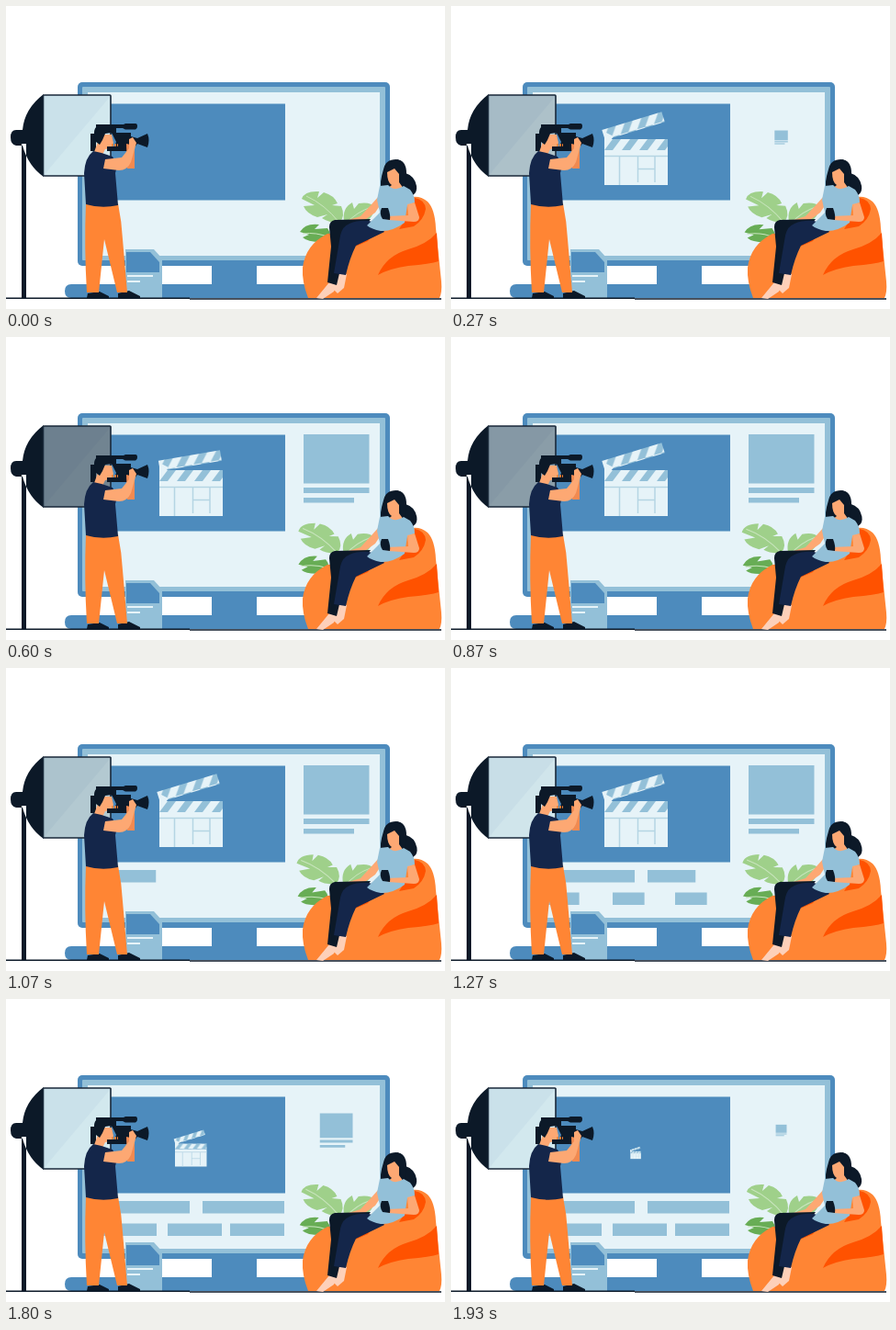
Write an HTML page that moves like this. It is 478 px wide and 330 px high and loops after 1990 ms.

```html
<!DOCTYPE html>
<html lang="en">
<head>
<meta charset="utf-8">
<title>Video studio</title>
<style>
html, body { margin: 0; width: 100%; height: 100%; overflow: hidden; background: #fff }
svg { display: block }
.soft { filter: blur(.6px) }
.blue { fill: #4d8bbd }
.sky { fill: #93c0d8 }
.pale { fill: #e6f3f8 }
.dark { fill: #0c1928 }
.navy { fill: #14264a }
.orange { fill: #ff8534 }
.red { fill: #ff5200 }
.skin { fill: #fda873 }
.leaf { fill: #9fd08a }
.moss { fill: #68ad55 }
.vein { fill: none; stroke: #c9e5be; stroke-width: 1 }
</style>
</head>
<body>
<svg width="478" height="330" viewBox="0 0 478 330">
  <defs>
    <pattern id="stripes" width="19" height="12" patternUnits="userSpaceOnUse" patternTransform="translate(167 145)">
      <path class="pale" d="M0 0H19V12H0Z"/>
      <path class="sky" d="M9 0H18L9 12H0Z"/>
    </pattern>
  </defs>

  <!-- monitor -->
  <g class="soft">
    <path class="blue" d="M71 303H340V318H71Q64 318 64 310.500T71 303ZM224 280H273V306H224Z"/>
    <rect class="blue" x="78" y="83" width="340" height="200" rx="5"/>
    <rect class="sky" x="83" y="88" width="330" height="189" rx="1"/>
    <rect class="pale" x="89" y="94" width="318" height="178"/>
    <rect class="blue" x="104" y="106.500" width="200" height="105"/>

    <g id="clapper">
      <path class="pale" d="M167 157H236V195H167Z"/>
      <path d="M167 145H236V157H167Z" fill="url(#stripes)"/>
      <path d="M167 163.500H236M183.500 164V195M203.500 164V192M222 164V192M203 177.500H222" fill="none" stroke="#b5d5e3" stroke-width="1.500"/>
      <path id="arm" d="M168 134.500H236V146H168Z" fill="url(#stripes)"/>
      <path class="pale" d="M167 137L177 142 171 150H167Z"/>
    </g>

    <g id="panel" class="sky">
      <rect x="324" y="106" width="71.500" height="53.500"/>
      <rect x="324" y="164" width="71.500" height="6"/>
      <rect x="324" y="175" width="55" height="5.500"/>
    </g>
    <g id="bars" class="sky"></g>
  </g>

  <!-- softbox -->
  <path class="dark" d="M17 150H22V318H17ZM41 96Q20 112 18 135H11Q5 135 5 143T11 152H18Q24 174 41 186Z"/>
  <rect x="40.500" y="97" width="73.500" height="88" rx="1" fill="#cae1ea"/>
  <path d="M48 176L113 99V185H41Z" fill="#d2e8ee"/>
  <rect id="shade" x="40.500" y="97" width="73.500" height="88" fill="#0c1a2e"/>
  <rect x="40.500" y="97" width="73.500" height="88" rx="1" fill="none" stroke="#1a293a" stroke-width="1.600"/>

  <!-- card -->
  <g class="soft">
    <path class="sky" d="M130 265H161L170 275V318H130Z"/>
    <path class="blue" d="M131 268H157L167 279V290H131Z"/>
    <path d="M132 294H160M132 300H146" stroke="#e6f3f8" stroke-width="2"/>
  </g>

  <path d="M0 318.200H200M200 319H474" stroke="#0c1928" stroke-width="1.400"/>

  <!-- cameraman -->
  <g class="soft">
    <path class="dark" d="M89 313L102 311 112 316V318H88ZM122 313L134 310 146 316V318H122Z"/>
    <path class="orange" d="M87 215H122Q126 235 127 254L132 312H121L107 254 101 312H88Q85 262 87 215Z"/>
    <path class="dark" d="M92 139H98V158H92Z"/>
    <path class="skin" d="M102 140H115L117 149 114 155 108 156 105 162 96 159 100 148Z"/>
    <path class="dark" d="M96 140Q95 129 107 129L119 131 120 139 115 138 108 139 105 146 102 151 98 148Z"/>
    <path class="dark" d="M98 129H128L130 128H141Q143 128 143 131T141 134.500H130L127 133H120V138H136V142L143 144 154 139Q157 146 154 154L143 150 137 158H110V153H118L120 148 116 140 112 134H98Z"/>
    <path class="navy" d="M95 158L104 160 116 164 121 174 119 182 122 217Q104 221 87 216L85 182Q86 165 95 158Z"/>
    <path d="M131 150L140 152V177H132Z" fill="#f18a51"/>
    <path class="skin" d="M108 167L126 165 134 155 134 145 138 143 142 149 140 156 136 170Q132 179 123 179L106 177Z"/>
    <path d="M115 151.500H122" stroke="#ff8534" stroke-width="2.500" stroke-dasharray="2 1"/>
  </g>

  <!-- plant -->
  <g class="soft">
    <g id="plant">
      <path class="moss" d="M320 246Q326 236 341 238L336 243 350 242Q356 250 349 256L341 254 343 257Q328 257 323 252L330 249Z"/>
      <path class="leaf" d="M322 210Q325 201 341 202L339 209 346 203Q357 206 361 215L355 217 365 218Q370 229 363 236Q351 236 344 231L350 227 339 230Q327 226 324 218L336 217Z"/>
      <path class="vein" d="M327 207Q347 216 363 236M323 248Q338 246 352 252"/>
      <path d="M362 233Q371 247 372 266" fill="none" stroke="#68ad55" stroke-width="2"/>
    </g>
    <g id="sprig">
      <path class="leaf" d="M368 234Q366 220 377 214L379 221 384 215Q397 213 402 219L394 222 400 225Q397 234 386 237L374 239Z"/>
      <path class="vein" d="M370 237Q382 224 398 219"/>
    </g>
  </g>

  <!-- woman on the beanbag -->
  <g class="soft">
    <path class="orange" d="M329 318Q322 300 323 285Q326 260 350 248L395 244 432 212Q447 203 459 213Q467 221 468 242L474 300Q475 312 472 318Z"/>
    <path class="red" d="M445 209Q456 211 457 221Q455 233 444 240L428 243 442 222ZM380 262Q385 250 401 246L394 256ZM405 293Q414 272 438 265Q459 259 469 247L471 278Q462 281 438 283Q417 286 405 293Z"/>
    <path id="tail" class="dark" d="M426 167Q436 170 435 182Q445 185 447 196Q448 203 443 206L440 212 428 201Z"/>
    <path class="dark" d="M411 178Q413 167 425 167Q436 168 436 182L434 199H409Q406 194 411 178Z"/>
    <path class="skin" d="M415 181L423 177 428 183 428 192 433 199Q424 204 415 199L420 195Q415 192 415 181ZM406 207L410 213 402 225 388 235 374 237 373 233 386 229 398 216Z"/>
    <path d="M359 290L371 292 368 307 361 313 357 309ZM352 301L360 303 357 311 345 319 338 318Z" fill="#fdd0b9"/>
    <path class="dark" d="M397 232L358 233Q352 234 352 241L354 262 350 301 360 304 368 270Z"/>
    <path class="navy" d="M395 234Q383 233 374 237Q366 240 364 250L357 291 370 293Q374 275 381 261L412 246 405 237Z"/>
    <path class="sky" d="M407 196L416 195Q423 203 433 196L440 200Q445 206 445 214L437 217 434 236Q420 246 408 245Q398 243 393 239L407 225 404 211Z"/>
    <path class="skin" d="M437 216L445 214 450 230Q450 235 444 235L416 233 415 229 438 228Z"/>
    <path class="dark" d="M409 220L416 220Q419 228 418 233L410 232Q406 226 409 220Z"/>
  </g>
</svg>
<script>
const LOOP = 1990, STEP = 2000 / 30;
const $ = id => document.getElementById(id);
const set = (el, transform) => el.setAttribute('transform', transform);
const ramp = (t, a, b) => Math.min(1, Math.max(0, (t - a) / (b - a)));
const ease = p => (1 - Math.cos(Math.PI * p)) / 2;
const zoom = (el, s, x, y) => set(el, `translate(${x} ${y}) scale(${s}) translate(${-x} ${-y})`);

// x, y, width, start time
const bars = [
  [111, 220, 89, 870], [214, 220, 89, 1070],
  [105, 244.5, 59, 1070], [176, 244.5, 59, 1070], [244, 244.5, 59, 1070]
].map(([x, y, width, start]) => {
  const el = document.createElementNS('http://www.w3.org/2000/svg', 'rect');
  const attrs = { x, y, height: 13.5 };
  for (const key in attrs) el.setAttribute(key, attrs[key]);
  $('bars').append(el);
  return { el, width, start };
});

function draw(now) {
  const t = Math.floor((now % LOOP + 4) / STEP) * STEP;
  const out = 1 - ramp(t, 1600, 2000);

  zoom($('clapper'), ramp(t, 0, 260) * out, 201, 170);
  zoom($('panel'), ramp(t, 200, 530) * out, 359.5, 143);
  const open = 1 - ramp(t, 500, 730) + ramp(t, 730, 860);
  set($('arm'), `rotate(${-17 * open} 168 147)`);

  for (const { el, width, start } of bars)
    el.setAttribute('width', width * ramp(t, start, start + 335));

  const dim = t < 630 ? ramp(t, 0, 630) : 1 - ramp(t, 630, 1330);
  $('shade').setAttribute('opacity', 0.49 * ease(dim));

  const sway = ease(1 - Math.abs(t / 1000 - 1));
  set($('plant'), `rotate(${-5 * sway} 352 275)`);
  set($('sprig'), `rotate(${-2 * sway} 372 265)`);
  set($('tail'), `rotate(${-1.5 * sway} 428 180)`);

  requestAnimationFrame(() => draw(performance.now() - begin));
}
const begin = performance.now();
draw(0);
</script>
</body>
</html>
```
